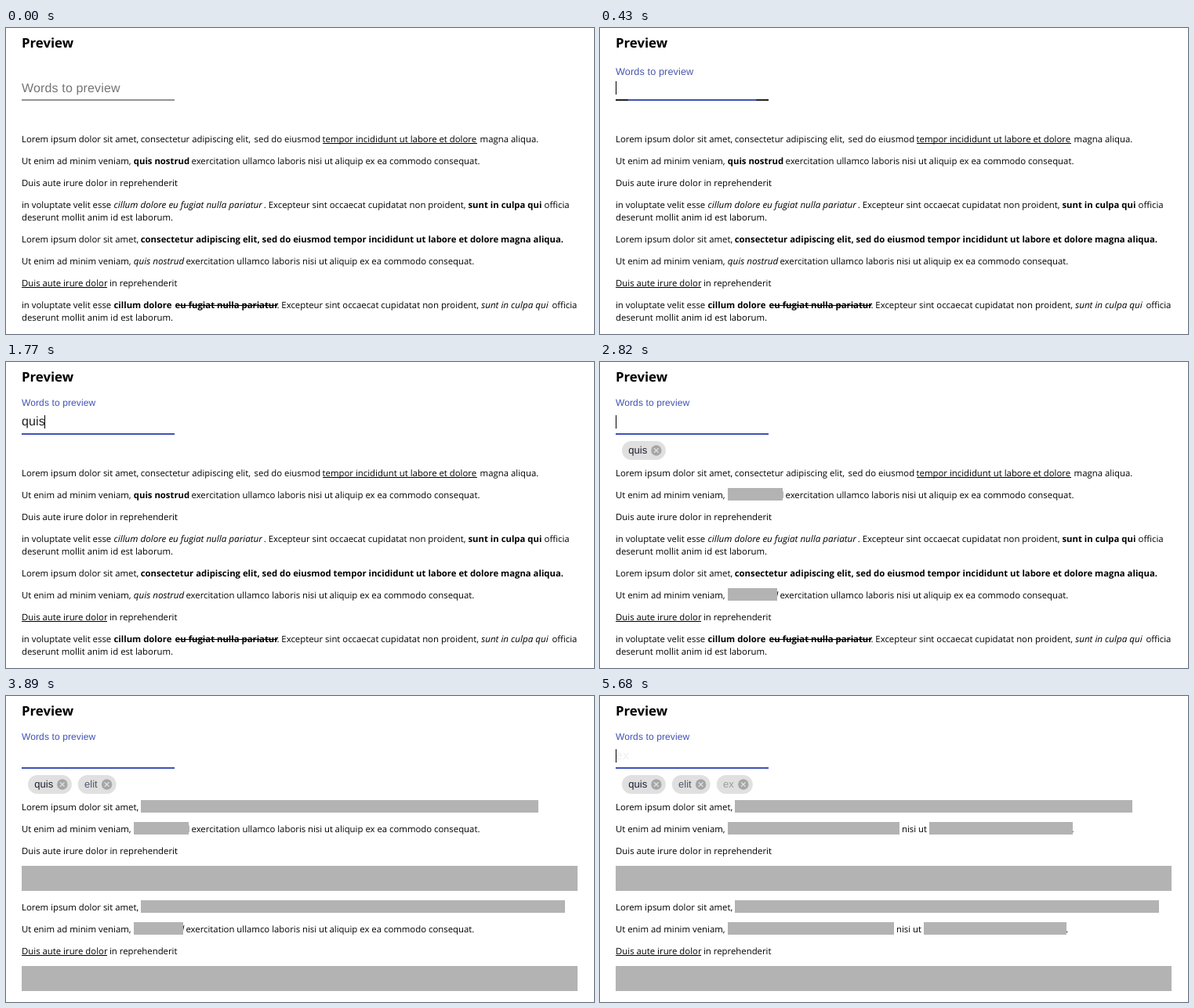
These frames come from a looping animation (750 by 391 pixels, 6180 ms). An HTML page:

```html
<!DOCTYPE html>
<html lang="en">
<head>
<meta charset="utf-8">
<title>Preview</title>
<style>
  html, body { margin: 0; width: 100%; height: 100%; overflow: hidden; background: #fff; }
  svg { display: block; text-rendering: geometricPrecision; white-space: pre; }
  .body { font: 11.36px "Open Sans", "Noto Sans", sans-serif; }
  .b { font-weight: 700; font-size: 11.32px; }
  .i { font-style: italic; font-size: 11.65px; }
  .title { font: 700 16.8px "Open Sans", "Noto Sans", sans-serif; }
  .field { font: 16px "Liberation Sans", Arial, sans-serif; letter-spacing: .15px; }
  .chip { font: 13px "Liberation Sans", Arial, sans-serif; }
</style>
</head>
<body>
<svg width="750" height="391" viewBox="0 0 750 391">
  <text class="title" x="20" y="25">Preview</text>
  <g class="field">
    <text id="label">Words to preview</text>
    <text id="ghost" x="20" y="81" fill="#efefef">ex</text>
    <text id="input" x="20" y="81" fill="#212121"></text>
  </g>
  <rect id="caret" y="68" width="1" height="17"/>
  <rect id="line" x="20" y="91" width="195" height="2"/>
  <rect id="focus" y="91" height="2" fill="#3f51b5"/>
  <g id="chips" class="chip"></g>
  <g id="body" class="body"></g>
  <g id="masks" fill="#b3b3b3"></g>
</svg>
<script>
const LOOP = 6180;
const $ = id => document.getElementById(id);

// Body text: [x, baseline, style, words]
const start = 'Lorem ipsum dolor sit amet,';
const enim = 'Ut enim ad minim veniam,';
const velit = 'in voluptate velit esse';
const exer = ['exercitation ullamco laboris', 'nisi ut', 'aliquip ex ea commodo consequat.'];
const sint = '. Excepteur sint occaecat cupidatat non proident,';
const end = 'deserunt mollit anim id est laborum.';
const runs = [
  [20, 146, '', start],
  [171.8, 146, '', 'consectetur adipiscing elit,'], [316.6, 146, '', 'sed do eiusmod'],
  [403.6, 146, '', 'tempor incididunt ut labore et dolore'], [604.6, 146, '', 'magna aliqua.'],
  [20, 174, '', enim], [162.8, 174, 'b', 'quis nostrud'],
  [236.5, 174, '', exer[0]], [385, 174, '', exer[1]], [419.6, 174, '', exer[2]],
  [20, 202, '', 'Duis aute irure dolor in reprehenderit'],
  [20, 230, '', velit], [137.5, 230, 'i', 'cillum dolore eu fugiat nulla pariatur'],
  [328.8, 230, '', sint], [589.5, 230, 'b', 'sunt in culpa qui'], [686.6, 230, '', 'officia'],
  [20, 246, '', end],
  [20, 274, '', start],
  [171.8, 274, 'b', 'consectetur adipiscing elit, sed do eiusmod tempor incididunt ut labore et dolore magna aliqua.'],
  [20, 302, '', enim], [162.8, 302, 'i', 'quis nostrud'],
  [229.4, 302, '', exer[0]], [378, 302, '', exer[1]], [412.5, 302, '', exer[2]],
  [20, 330, '', 'Duis aute irure dolor'], [132, 330, '', 'in reprehenderit'],
  [20, 358, '', velit], [137.5, 358, 'b', 'cillum dolore'], [215.6, 358, 'b', 'eu fugiat nulla pariatur'],
  [345.4, 358, '', sint], [606.2, 358, 'i', 'sunt in culpa qui'], [696.4, 358, '', 'officia'],
  [20, 374, '', end]
];
const rect = (x, y, w, h) => `<rect x="${x}" y="${y}" width="${w}" height="${h}"/>`;
$('body').innerHTML =
  runs.map(([x, y, c, s]) => `<text class="${c}" x="${x}" y="${y}">${s}</text>`).join('') +
  rect(404, 147, 197, 1) + rect(20, 331, 109, 1) + rect(216, 354, 130, 1);

// Each word: its chip and the areas it hides
const words = [
  { text: 'quis', x: 28, w: 55.8, fill: '#1d1d2e',
    hides: [[163, 161, 70, 16], [163, 289, 63, 16]] },
  { text: 'elit', x: 91.8, w: 48.8, fill: '#4f5669',
    hides: [[172, 133, 507, 16], [20, 217, 709, 32], [172, 261, 541, 16], [20, 345, 709, 32]] },
  { text: 'ex', x: 148.8, w: 46, fill: '#9b9b9b',
    hides: [[163, 161, 219, 16], [420, 161, 183, 16], [163, 289, 212, 16], [413, 289, 182, 16]] }
];
for (const { text, x, w, fill, hides } of words) {
  const cx = x + w - 12;
  $('chips').innerHTML += `<g><rect x="${x}" y="101" width="${w}" height="24" rx="12" fill="#e0e0e0"/>
    <text x="${x + 8.3}" y="117" fill="${fill}">${text}</text>
    <circle cx="${cx}" cy="113" r="6.7" fill="#a6a6a6"/>
    <path d="M${cx - 2.8} 110.2l5.6 5.6m0-5.6l-5.6 5.6" stroke="#e0e0e0" stroke-width="1.3"/></g>`;
  $('masks').innerHTML += `<g>${hides.map(h => rect(...h)).join('')}</g>`;
}

// [time, typed text, caret shown, words entered]
const steps = [
  [0, '', 0, 0], [330, '', 1, 0], [880, '', 0, 0],
  [1330, 'q', 1, 0], [1510, 'qu', 1, 0], [1560, 'qui', 1, 0], [1770, 'quis', 1, 0],
  [2140, '', 1, 1], [2290, '', 0, 1], [2820, '', 1, 1],
  [3010, 'e', 1, 1], [3090, 'el', 1, 1], [3170, 'eli', 1, 1], [3320, 'elit', 1, 1], [3840, 'elit', 0, 1],
  [3890, '', 0, 2], [4370, '', 1, 2],
  [4500, 'e', 1, 2], [4660, 'ex', 1, 2], [5160, 'ex', 0, 2],
  [5190, '', 0, 3], [5680, '', 1, 3]
];

const ease = (t, from, ms) => 1 - (1 - Math.min(1, Math.max(0, (t - from) / ms))) ** 2.6;
const mix = (a, b, p) => a + (b - a) * p;
const rgb = (a, b, p) => `rgb(${a.map((v, i) => Math.round(mix(v, b[i], p)))})`;
const show = (el, on) => el.setAttribute('visibility', on ? 'visible' : 'hidden');

function draw(t) {
  const hover = ease(t, 40, 240), focus = ease(t, 330, 200);
  $('label').setAttribute('transform', `translate(20 ${mix(82, 56, focus)}) scale(${mix(1, .75, focus)})`);
  $('label').setAttribute('fill', rgb([117, 117, 117], [63, 81, 181], focus));
  $('line').setAttribute('fill', rgb([148, 148, 148], [33, 33, 33], hover));
  $('focus').setAttribute('x', 117.5 - 97.5 * focus);
  $('focus').setAttribute('width', 195 * focus);

  const [, text, caret, count] = steps.filter(s => s[0] <= t).pop();
  $('input').textContent = text;
  $('caret').setAttribute('x', Math.floor(20 + (text && $('input').getComputedTextLength())));
  show($('caret'), caret);
  show($('ghost'), count === 3);
  words.forEach((_, i) => {
    show($('chips').children[i], i < count);
    show($('masks').children[i], i < count);
  });
}

const t0 = performance.now();
function tick() {
  draw((performance.now() - t0) % LOOP);
  requestAnimationFrame(tick);
}
tick();
</script>
</body>
</html>
```
